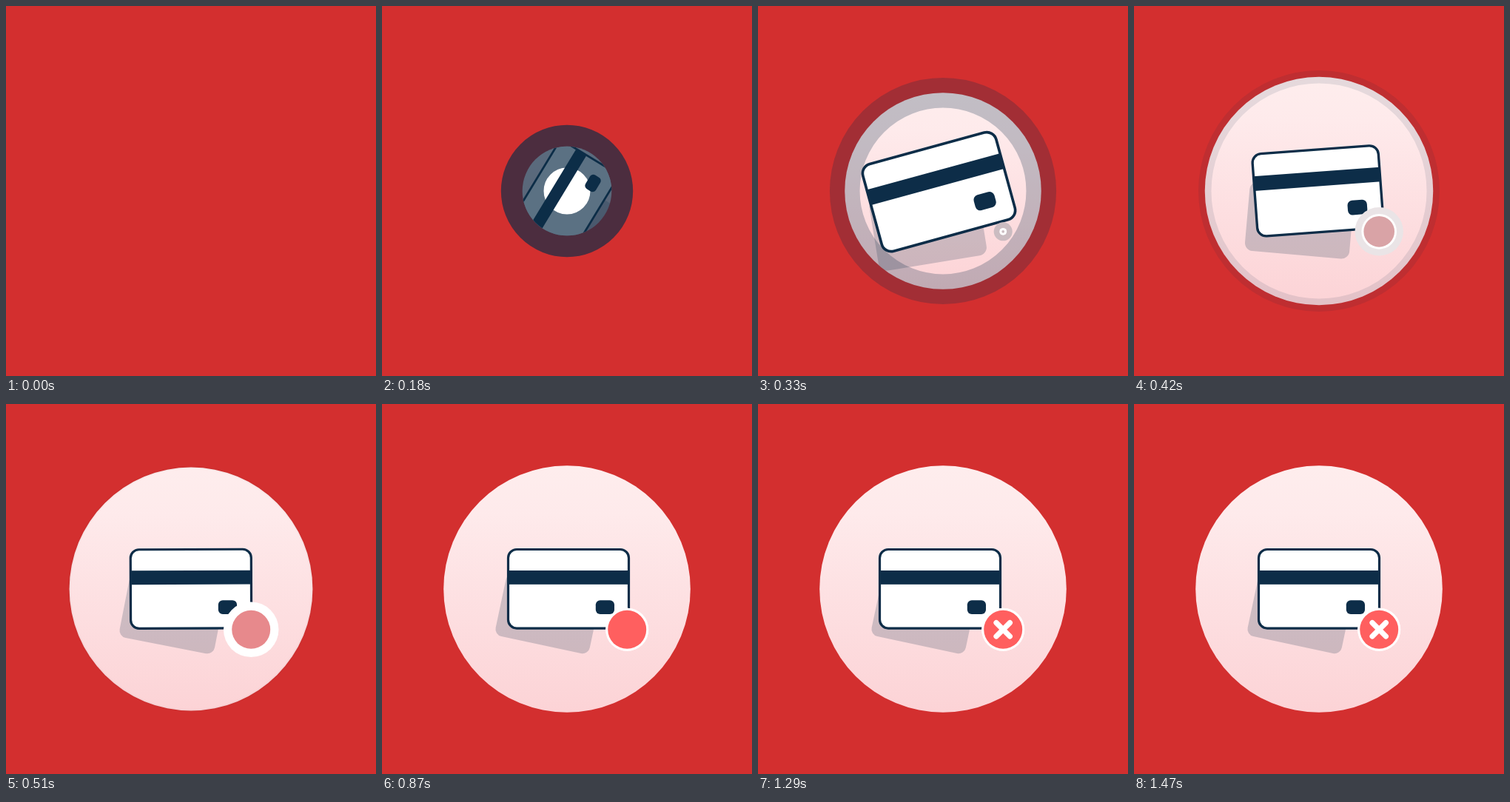
These frames come from a looping animation (500 px wide and 500 px high, 1.83 s). An HTML page with a canvas:

```html
<!DOCTYPE html>
<html lang="en">
<head>
<meta charset="utf-8">
<title>Card declined</title>
<style>
html, body { margin: 0; width: 100%; height: 100%; overflow: hidden; background: #d32f2f; }
canvas { display: block; width: 100vw; height: 100vh; }
</style>
</head>
<body>
<canvas id="stage" width="500" height="500"></canvas>
<script>
const ctx = document.getElementById('stage').getContext('2d');
const LOOP = 1830, STEP = 30, LAG = 30;
const NAVY = '#0d2d48', GRAY = [203, 188, 193], WHITE = [255, 255, 255], RED = [255, 95, 95];
const CENTER = 250, DISC_RADIUS = 166.8;
const PIVOT = { x: 259.5, y: 264.6 };
const BADGE = { x: 331.2, y: 304.8, radius: 26, rim: 3 };

const clamp = v => Math.min(1, Math.max(0, v));
const progress = (t, from, to) => clamp((t - from) / (to - from));
const mix = (a, b, p) => a + (b - a) * p;
const blend = (a, b, p) => `rgb(${a.map((v, i) => Math.round(mix(v, b[i], p))).join()})`;

// Cubic bezier (.33, 0, .33, 1), solved by bisection.
function ease(u) {
  if (u <= 0 || u >= 1) return clamp(u);
  let lo = 0, hi = 1;
  for (let i = 0; i < 24; i++) {
    const s = (lo + hi) / 2;
    if (0.99 * s * (1 - s) + s ** 3 < u) lo = s; else hi = s;
  }
  return lo * lo * (3 - 2 * lo);
}

const eased = (t, from, to) => ease(progress(t, from, to));

// Grows from nothing to a peak, then settles at 1.
function swell(t, start, top, end, peak) {
  return t < top ? peak * eased(t, start, top) : mix(peak, 1, eased(t, top, end));
}

// Five even, linear swings from side to side.
function shake(t) {
  const n = 5 * progress(t, 840, 1440), i = Math.floor(n);
  const side = k => k % 5 ? -8 * (-1) ** k : 0;
  return mix(side(i), side(i + 1), n - i);
}

function circle(x, y, r, fill) {
  if (r <= 0) return;
  ctx.beginPath();
  ctx.arc(x, y, r, 0, Math.PI * 2);
  ctx.fillStyle = fill;
  ctx.fill();
}

function roundRect(x, y, w, h, r, fill) {
  ctx.beginPath();
  ctx.roundRect(x, y, w, h, r);
  ctx.fillStyle = fill;
  ctx.fill();
}

// Card and shadow share one entrance around a common pivot.
function posed(t, draw) {
  const scale = swell(t, 10, 330, 520, 1.145);
  ctx.save();
  ctx.translate(PIVOT.x + shake(t), PIVOT.y);
  ctx.rotate(-Math.PI / 2 * (1 - eased(t, 27, 538)));
  ctx.scale(scale, scale);
  draw();
  ctx.restore();
}

function drawShadow() {
  ctx.translate(-35.4, 18.8);
  ctx.rotate(Math.PI / 15);
  roundRect(-65, -43, 130, 86, 10, 'rgba(13,45,72,.2)');
}

function drawCard() {
  ctx.translate(-9.5, -14.8);
  roundRect(-81.5, -53.3, 163, 106.6, 11.5, '#fff');
  ctx.lineWidth = 3.2;
  ctx.strokeStyle = NAVY;
  ctx.stroke();
  ctx.fillStyle = NAVY;
  ctx.fillRect(-82, -24.8, 164, 18.8);
  roundRect(36.8, 15.5, 25.2, 18.8, 6, NAVY);
}

function drawDisc(t) {
  const e = eased(t, 0, 588), r = DISC_RADIUS * e;
  if (r <= 0) return;
  const tint = ctx.createLinearGradient(0, CENTER - r, 0, CENTER + r);
  tint.addColorStop(0, '#feeded');
  tint.addColorStop(0.2, '#feeaeb');
  tint.addColorStop(1, '#fcd3d6');
  ctx.save();
  circle(CENTER, CENTER, r, tint);
  ctx.clip();
  posed(t - LAG, drawShadow);
  posed(t, drawCard);
  ctx.restore();

  if (e === 1) return;
  ctx.globalAlpha = (1 - e) ** 0.88;
  ctx.beginPath();
  ctx.arc(CENTER, CENTER, r, 0, Math.PI * 2);
  ctx.lineWidth = 250 * e * (1 - e);
  ctx.strokeStyle = NAVY;
  ctx.stroke();
  ctx.globalAlpha = 1;
}

function drawCross(scale) {
  if (scale <= 0) return;
  const arm = 9.2 * scale;
  ctx.beginPath();
  for (const side of [-1, 1]) {
    ctx.moveTo(BADGE.x - arm * side, BADGE.y - arm);
    ctx.lineTo(BADGE.x + arm * side, BADGE.y + arm);
  }
  ctx.lineWidth = 7.2 * scale;
  ctx.lineCap = 'round';
  ctx.strokeStyle = '#fff';
  ctx.stroke();
}

function drawBadge(t) {
  const { x, y, radius, rim } = BADGE;
  const halo = (radius + rim) * swell(t, 255, 510, 720, 1.285);
  const core = radius * eased(t, 300, 512);
  circle(x, y, halo, blend(GRAY, WHITE, progress(t, 330, 480)));
  if (core > 0) circle(x, y, core + rim, '#fff');
  circle(x, y, core, blend(GRAY, RED, progress(t, 330, 660)));
  drawCross(swell(t, 870, 990, 1080, 1.1));
}

function render(t) {
  ctx.fillStyle = '#d32f2f';
  ctx.fillRect(0, 0, 500, 500);
  drawDisc(t);
  drawBadge(t);
}

const start = performance.now();
function tick() {
  const t = (performance.now() - start) % LOOP;
  render(Math.floor(t / STEP) * STEP);
  requestAnimationFrame(tick);
}
tick();
</script>
</body>
</html>
```
